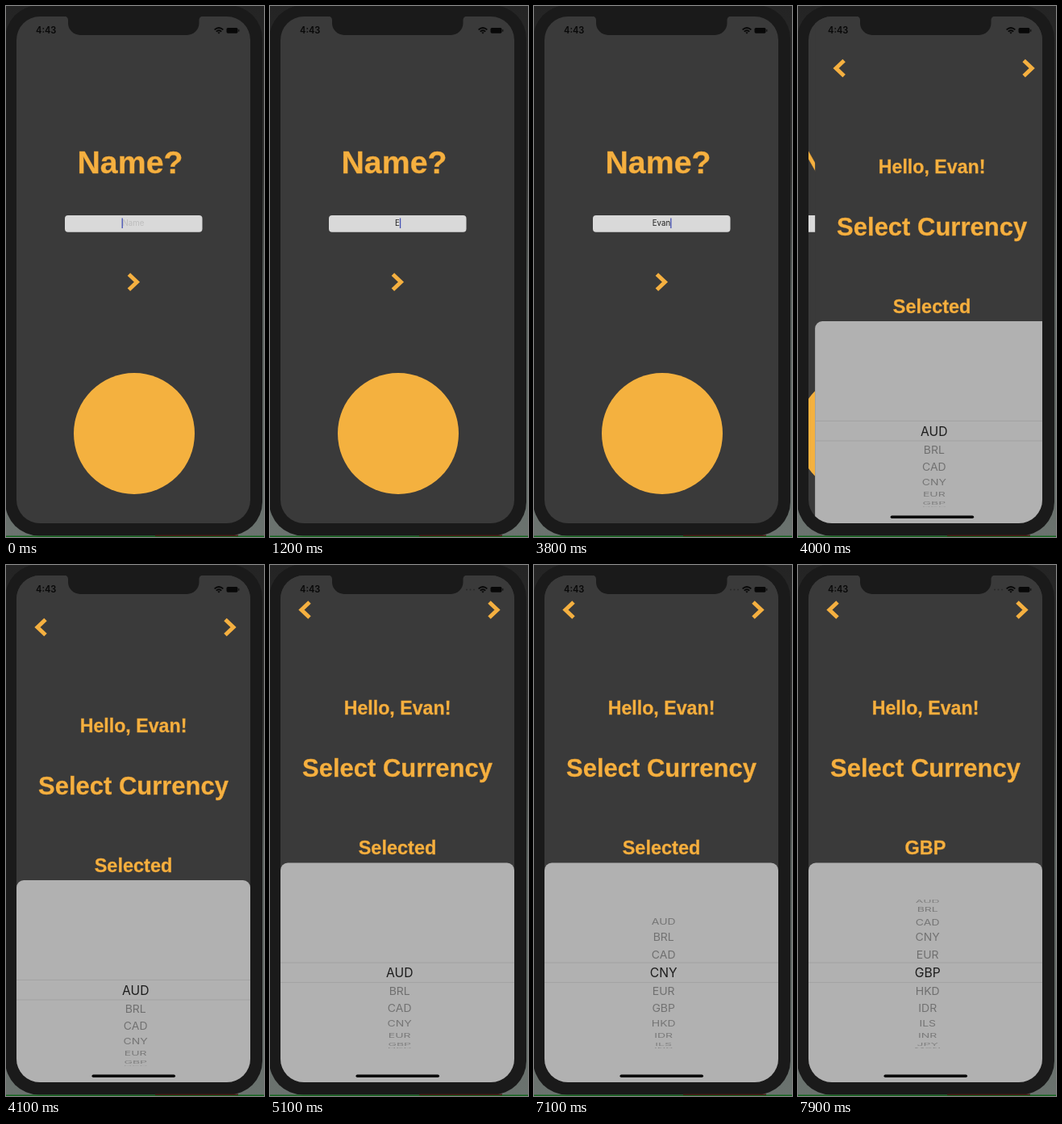
Animation, 320 px wide and 657 px high, one loop 8000 ms. Source, as an HTML page:

```html
<!DOCTYPE html>
<html lang="en">
<head>
<meta charset="utf-8">
<title>Currency picker</title>
<style>
  html, body { margin: 0; width: 100%; height: 100%; overflow: hidden; background: #1a1a1a; }
  svg { display: block; width: 100vw; height: 100vh; }
  text { text-anchor: middle; }
  .title { font-family: "Liberation Sans", Arial, sans-serif; font-weight: 700; fill: #f5b040; stroke: #e39a2f; stroke-width: .35; }
  .ui { font-family: Inter, Roboto, sans-serif; }
  .chevron { fill: none; stroke: #f5b040; stroke-width: 5; }
</style>
</head>
<body>
<svg viewBox="0 0 320 657" preserveAspectRatio="none">
  <defs>
    <linearGradient id="backdrop" x1="0" y1="0" x2="0" y2="1">
      <stop offset="0" stop-color="#242424"/>
      <stop offset=".3" stop-color="#30302f"/>
      <stop offset=".55" stop-color="#59605d"/>
      <stop offset="1" stop-color="#6b736f"/>
    </linearGradient>
    <clipPath id="screen"><rect x="13" y="13" width="290" height="627" rx="29"/></clipPath>
    <clipPath id="wheelClip"><rect x="13" y="411" width="290" height="187"/></clipPath>
  </defs>

  <rect width="320" height="657" fill="url(#backdrop)"/>
  <rect x="-1" y="-1" width="319" height="656.500" rx="42" fill="#1a1a1a"/>
  <rect y="655.500" width="320" height="1.500" fill="#14661f"/>
  <rect x="185" y="654.500" width="103" height="1.500" fill="#4a1a14"/>

  <g clip-path="url(#screen)">
    <rect x="13" y="13" width="290" height="627" fill="#3a3a3a"/>
    <g id="namePage">
      <text class="title" x="154" y="207.300" font-size="39.300">Name?</text>
      <rect x="73" y="259" width="170.500" height="20.700" rx="4" fill="#d9d9d9"/>
      <text id="entry" class="ui" x="158" y="272.400" font-size="9.700"></text>
      <rect id="caret" y="262.500" width="1.300" height="12.500" fill="#4450b4"/>
      <path class="chevron" d="M152.400 332l10 9.500-10 9.500"/>
      <circle cx="159" cy="529" r="75" fill="#f4b13f"/>
    </g>
    <g id="currencyPage">
      <rect x="13" y="13" width="290" height="627" fill="#3a3a3a"/>
      <g id="content">
        <path class="chevron" d="M49 46l-10 9.500 10 9.500M272 46l10 9.500-10 9.500"/>
        <text class="title" x="158" y="185" font-size="23.200">Hello, Evan!</text>
        <text class="title" x="158" y="262" font-size="31">Select Currency</text>
        <text id="choice" class="title" x="158" y="358" font-size="23.500"></text>
        <rect x="13" y="368.500" width="290" height="330" rx="9" fill="#b1b1b1"/>
        <path d="M13 492h290M13 516.500h290" stroke="#a0a0a0" stroke-width=".8"/>
        <g id="wheel" class="ui" clip-path="url(#wheelClip)"></g>
      </g>
      <rect x="106.500" y="630.500" width="103.500" height="3.600" rx="1.800" fill="#050505"/>
    </g>
  </g>

  <path d="M72 12.500q5 .5 5 5v3.500a15 15 0 0 0 15 15h132.500a15 15 0 0 0 15-15v-3.500q0-4.500 5-5z" fill="#1a1a1a"/>
  <g fill="#080808">
    <text class="ui" x="49.700" y="34.300" font-size="11.100" font-weight="600">4:43</text>
    <g fill="none" stroke="#080808" stroke-width="1.700">
      <path d="M258.600 29.300q5.400-4.600 10.800 0M260.700 31.600q3.300-2.700 6.600 0"/>
    </g>
    <path d="M262.300 32.800q1.700-1.300 3.400 0l-1.700 1.800z"/>
    <rect x="273.500" y="27" width="14" height="6.800" rx="1.800"/>
    <rect x="288.300" y="29" width="1" height="2.800" rx=".5"/>
    <g id="dots" fill="#292929">
      <circle cx="244" cy="30.500" r="1"/><circle cx="248.500" cy="30.500" r="1"/><circle cx="253" cy="30.500" r="1"/>
    </g>
  </g>
</svg>
<script>
const LOOP = 8000;
const NAME = "Evan";
const KEY_TIMES = [1000, 1300, 1500, 1700];
const CODES = "AUD BRL CAD CNY EUR GBP HKD IDR ILS INR JPY MXN NOK NZD".split(" ");
const PUSH = [3820, 4080], SETTLE = 4300, SCROLL = [6600, 7700], CHOSEN = 7750;
const WHEEL = { x: 160.700, y: 504.500, radius: 95, step: 13.800 * Math.PI / 180 };

const $ = id => document.getElementById(id);
const [entry, caret, namePage, currencyPage, content, choice, wheel, dots] =
  ["entry", "caret", "namePage", "currencyPage", "content", "choice", "wheel", "dots"].map($);
const progress = (t, [from, to]) => Math.min(1, Math.max(0, (t - from) / (to - from)));
const easeOut = (p, power) => 1 - (1 - p) ** power;
const show = (el, on) => el.setAttribute("visibility", on ? "visible" : "hidden");

const rows = CODES.map(code => {
  const row = document.createElementNS("http://www.w3.org/2000/svg", "text");
  row.textContent = code;
  row.setAttribute("font-size", 14);
  row.setAttribute("y", 5.100);
  return wheel.appendChild(row);
});

function drawEntry(t) {
  const typed = NAME.slice(0, KEY_TIMES.filter(k => k <= t).length);
  const label = typed || "Name";
  if (entry.textContent !== label) entry.textContent = label;
  entry.setAttribute("fill", typed ? "#222" : "#bdbdbd");
  const half = entry.getComputedTextLength() / 2;
  caret.setAttribute("x", 158 + (typed ? half : -half - 1));

  // The caret stays solid while typing, then fades in a one second cycle.
  const phase = t % 1000 / 1000;
  const typing = t >= 900 && t < 2100;
  const blink = phase < 0.5 ? 1 : phase < 0.68 ? 1 - (phase - 0.5) / 0.18 : phase < 0.73 ? 0 : 1;
  caret.setAttribute("opacity", typing ? 1 : blink);
}

function drawWheel(t) {
  const position = 5 * easeOut(progress(t, SCROLL), 1.512);
  rows.forEach((row, i) => {
    const offset = i - position, angle = offset * WHEEL.step;
    const near = Math.max(0, 1 - Math.abs(offset) * 1.7);
    const depth = Math.cos(angle);
    show(row, Math.abs(angle) < 1.5);
    const zoom = 1 + 0.12 * near;
    row.setAttribute("transform",
      `translate(${WHEEL.x} ${WHEEL.y + WHEEL.radius * Math.sin(angle)}) scale(${zoom} ${zoom * depth})`);
    const shade = 28 + 82 * (1 - near) + 28 * (1 - depth);
    row.setAttribute("fill", `rgb(${shade},${shade},${shade})`);
  });
}

function draw(t) {
  const slide = easeOut(progress(t, PUSH), 3);
  namePage.setAttribute("transform", `translate(${-87 * slide})`);
  currencyPage.setAttribute("transform", `translate(${290 * (1 - slide)})`);
  show(namePage, slide < 1);
  currencyPage.style.display = slide > 0 ? "" : "none";
  content.setAttribute("transform", `translate(0 ${t < SETTLE ? 21.500 : 0})`);
  show(dots, t >= SETTLE);
  choice.textContent = t < CHOSEN ? "Selected" : "GBP";
  drawEntry(t);
  drawWheel(t);
}

const start = performance.now();
function tick() {
  draw((performance.now() - start) % LOOP);
  requestAnimationFrame(tick);
}
tick();
</script>
</body>
</html>
```
